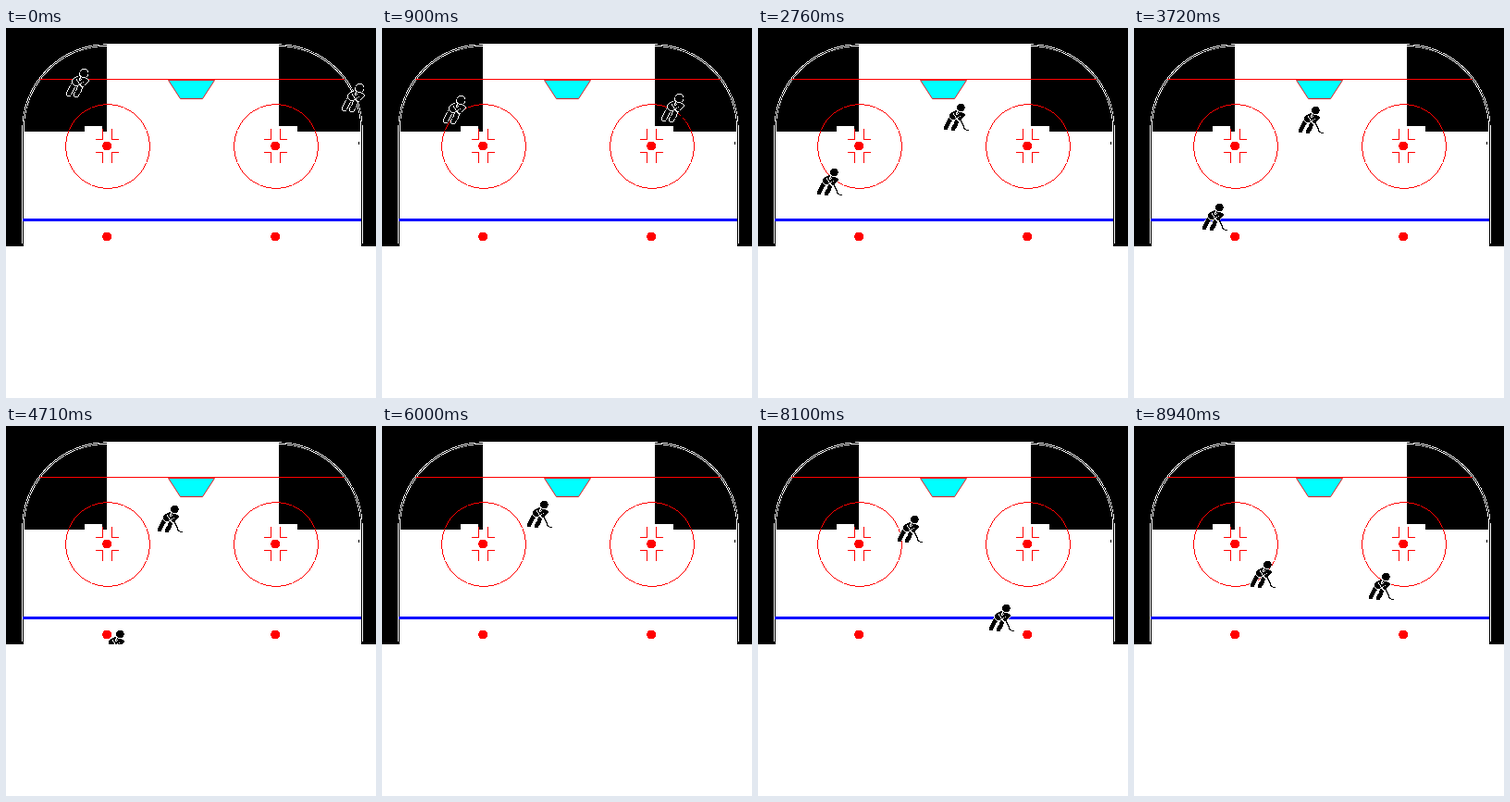
An HTML page with a canvas that plays this animation: 400 px wide and 400 px high, repeating every 8970 ms.

```html
<!DOCTYPE html>
<html lang="en">
<head>
<meta charset="utf-8">
<title>Hockey drill</title>
<style>
html, body { margin: 0; width: 100%; height: 100%; overflow: hidden; background: #fff; }
canvas { display: block; }
</style>
</head>
<body>
<canvas id="stage" width="400" height="400"></canvas>
<script>
const LOOP = 8970, STEP = 30, ICE_END = 236, PAD = 2;
const RED = '#f00';
const ctx = document.getElementById('stage').getContext('2d');

// Turning points of each skater: time, left, top
const paths = [
  [[0, 65, 44], [1770, 67, 104], [2760, 63, 151], [3600, 70, 185],
   [4710, 104, 220], [5700, 145, 241], [7260, 236, 221], [8940, 253, 158]],
  [[0, 363, 60], [1770, 246, 80], [2760, 200, 81], [4710, 163, 85],
   [5280, 175, 71], [6000, 156, 80], [7260, 169, 59], [8940, 125, 145]]
];

function layer(w, h) {
  const c = document.createElement('canvas');
  c.width = w;
  c.height = h;
  return c.getContext('2d');
}

// Hard pixel edges: every channel becomes 0 or 255
function snap(g) {
  const { width, height } = g.canvas;
  const img = g.getImageData(0, 0, width, height);
  for (let i = 0; i < img.data.length; i++) img.data[i] = img.data[i] < 128 ? 0 : 255;
  g.putImageData(img, 0, 0);
}

function line(g, color, width, ...pts) {
  g.beginPath();
  pts.forEach(([x, y]) => g.lineTo(x, y));
  g.strokeStyle = color;
  g.lineWidth = width;
  g.stroke();
}

function makeRink() {
  const g = layer(400, 400);
  const box = (color, x, y, w, h) => {
    g.fillStyle = color;
    g.fillRect(x, y, w, h);
  };
  const circle = (x, y, r) => {
    g.beginPath();
    g.arc(x, y, r, 0, 7);
  };

  box('#fff', 0, 0, 400, 400);
  box('#000', 0, 0, 400, ICE_END);
  box('#fff', 18, 112, 367, ICE_END - 112);
  box('#fff', 85, 106, 19, 6);
  box('#fff', 295, 106, 20, 6);

  // Boards: a white line split by a thin black one
  g.save();
  g.beginPath();
  g.rect(0, 0, 400, ICE_END);
  g.clip();
  for (const [color, width] of [['#fff', 2.4], ['#000', 1]]) {
    g.beginPath();
    g.roundRect(18.5, 18.5, 366, 300, 91);
    g.strokeStyle = color;
    g.lineWidth = width;
    g.stroke();
  }
  g.restore();
  box('#fff', 109, 18, 186, 94);
  box('#000', 381, 123, 1, 3);

  for (const x of [109, 291]) {
    circle(x + 1, 128, 45.5);
    g.strokeStyle = RED;
    g.lineWidth = 1;
    g.stroke();
    for (const y of [120, 134]) {
      box(RED, x - 12, y, 8, 1);
      box(RED, x + 5, y, 8, 1);
      box(RED, x - 5, y < 128 ? 109 : y, 1, 12);
      box(RED, x + 5, y < 128 ? 109 : y, 1, 12);
    }
    for (const y of [127.5, 225.5]) {
      circle(x + 0.3, y, 5.1);
      g.fill();
    }
  }

  box('#00f', 18, 206, 366, 3);
  snap(g);

  // Net and goal line
  g.beginPath();
  for (const [x, y] of [[175.5, 56.5], [225.5, 56.5], [212.5, 76.5], [188.5, 76.5]]) g.lineTo(x, y);
  g.closePath();
  g.fillStyle = '#0ff';
  g.fill();
  g.strokeStyle = '#ed1c24';
  g.stroke();
  box(RED, 36, 55, 330, 1);
  return g.canvas;
}

function makeSkater() {
  const g = layer(34, 38);
  g.translate(PAD, PAD);
  g.lineJoin = g.lineCap = 'round';

  const limb = (width, ...pts) => {
    line(g, '#fff', width + 1.6, ...pts);
    line(g, '#000', width, ...pts);
  };

  limb(4.5, [9, 16], [6, 21], [3, 27]);
  limb(4.5, [15, 19], [14, 23], [11, 28]);
  limb(8, [11, 14], [15, 12]);
  limb(4, [17, 11], [22, 13], [18, 17]);
  limb(8.6, [19.3, 5], [19.3, 5.01]);
  // Jersey stripes
  line(g, '#fff', 1, [11, 11], [17, 20]);
  line(g, '#fff', 1, [15, 10], [19, 15]);
  // Stick
  line(g, '#000', 1.3, [17, 13], [23.5, 28.5], [27, 29.5]);
  snap(g);
  return g.canvas;
}

const rink = makeRink();
const skater = makeSkater();

function slope(keys, i, k) {
  const a = keys[Math.max(i - 1, 0)];
  const b = keys[Math.min(i + 1, keys.length - 1)];
  return (b[k] - a[k]) / (b[0] - a[0]);
}

// Smooth curve through the turning points
function place(keys, t, k) {
  let i = 0;
  while (i < keys.length - 2 && t > keys[i + 1][0]) i++;
  const a = keys[i], b = keys[i + 1];
  const d = b[0] - a[0], u = (t - a[0]) / d, v = 1 - u;
  return Math.round(
    v * v * (1 + 2 * u) * a[k] + u * u * (3 - 2 * u) * b[k] +
    u * v * d * (v * slope(keys, i, k) - u * slope(keys, i + 1, k))
  );
}

function draw(now) {
  const t = Math.floor((now % LOOP) / STEP) * STEP;
  ctx.drawImage(rink, 0, 0);
  ctx.save();
  ctx.beginPath();
  ctx.rect(0, 0, 400, ICE_END);
  ctx.clip();
  for (const keys of paths) {
    ctx.drawImage(skater, place(keys, t, 1) - PAD, place(keys, t, 2) - PAD);
  }
  ctx.restore();
}

const start = performance.now();
function tick() {
  draw(performance.now() - start);
  requestAnimationFrame(tick);
}
tick();
</script>
</body>
</html>
```
